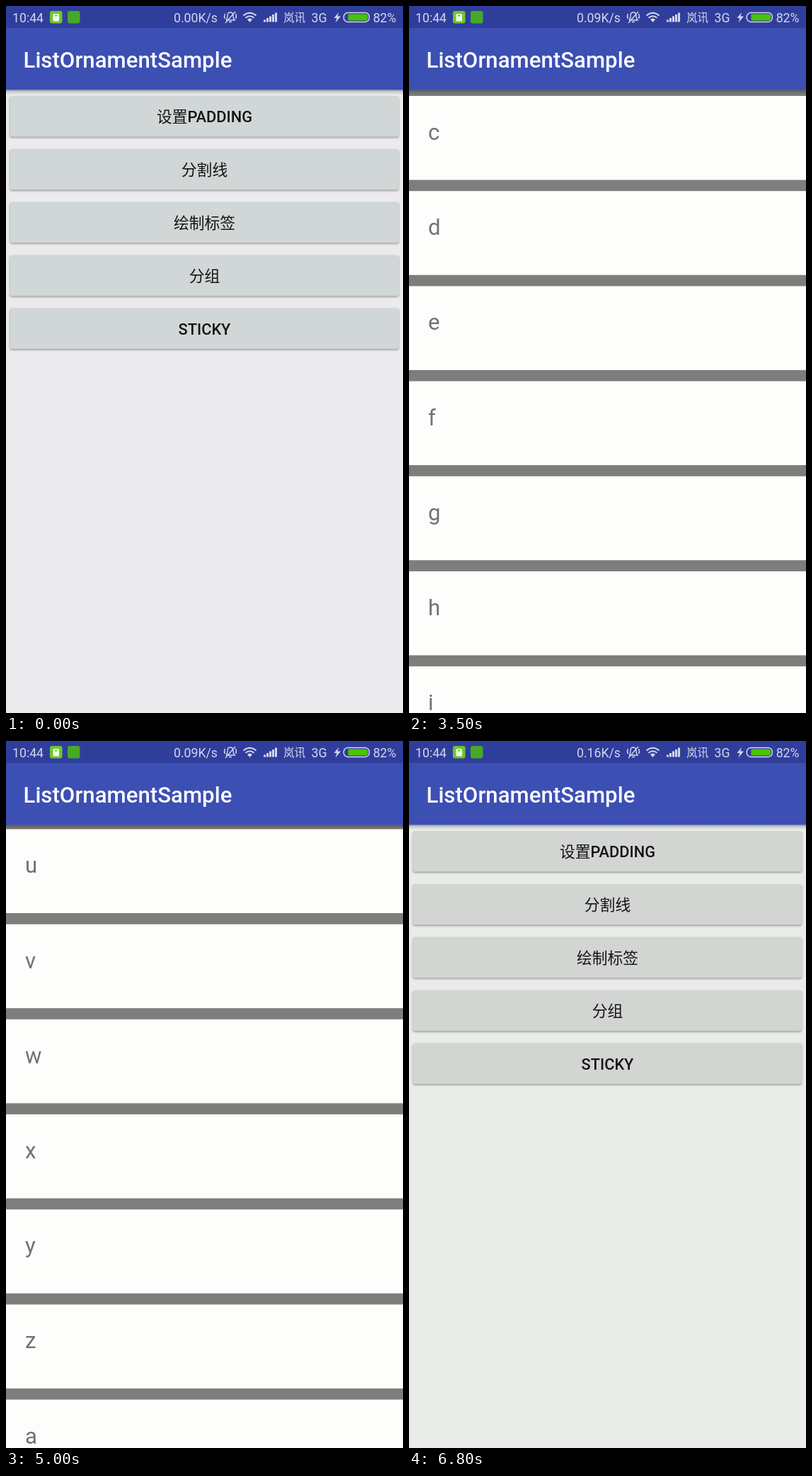
Write an HTML page with a canvas that moves like this. It is 561 by 998 pixels and loops after 7.3 s.

```html
<!DOCTYPE html>
<html lang="zh">
<head>
<meta charset="utf-8">
<style>
html, body { margin: 0; width: 100%; height: 100%; overflow: hidden; background: #eaecea; }
canvas { display: block; }
</style>
</head>
<body>
<canvas id="stage" width="561" height="998"></canvas>
<script>
const W = 561, H = 998, LOOP = 7300, STEP = 100;
const BAR_TOP = 31, BAR_END = 118.5;
const ROW = 134.2, ROW_BODY = 118.5;
const LABELS = ['设置PADDING', '分割线', '绘制标签', '分组', 'STICKY'];
const FAMILY = 'Roboto, "Noto Sans CJK SC", "Noto Sans CJK", sans-serif';
const ICON = '#d3d7ec';
const c = document.getElementById('stage').getContext('2d');

const easeOut = (t, start, length, power) =>
  1 - (1 - Math.min(1, Math.max(0, (t - start) / length))) ** power;

function rect(x, y, w, h, color) {
  c.fillStyle = color;
  c.fillRect(x, y, w, h);
}

function round(x, y, w, h, r, color) {
  c.beginPath();
  c.roundRect(x, y, w, h, r);
  c.fillStyle = color;
  c.fill();
}

function text(str, x, y, size, color, weight = 400, align = 'left') {
  c.font = `${weight} ${size}px ${FAMILY}`;
  c.textAlign = align;
  c.fillStyle = color;
  c.fillText(str, x, y);
}

function stroke(path, width = 1.5) {
  c.strokeStyle = ICON;
  c.lineWidth = width;
  c.stroke(new Path2D(path));
}

function appBar() {
  const shade = c.createLinearGradient(0, BAR_END, 0, BAR_END + 7);
  shade.addColorStop(0, 'rgba(0,0,0,.32)');
  shade.addColorStop(.4, 'rgba(0,0,0,.12)');
  shade.addColorStop(1, 'rgba(0,0,0,0)');
  rect(0, BAR_END, W, 7, shade);
  rect(0, 0, W, BAR_TOP, '#303e9b');
  rect(0, BAR_TOP, W, BAR_END - BAR_TOP, '#3c4fb2');
  text('ListOrnamentSample', 24.5, 87, 31.2, '#fbfcff', 500);
}

function menu(t) {
  const early = t < 2000;
  rect(0, 0, W, H, early ? '#ebebed' : '#eaecea');
  LABELS.forEach((label, i) => {
    const y = 127 + 74.9 * i;
    c.save();
    c.shadowColor = 'rgba(0,0,0,.35)';
    c.shadowBlur = 3;
    c.shadowOffsetY = 1.5;
    round(5.5, y, 549.5, 57.5, 3, early ? '#d1d6d6' : '#d3d5d2');
    c.restore();
    text(label, W / 2, y + 37.4, 21.8, '#141616', 500, 'center');
  });
  appBar();
}

function list(scroll) {
  rect(0, 0, W, H, '#fdfefc');
  for (let i = Math.floor(scroll / ROW); ; i++) {
    const y = BAR_END + i * ROW - scroll;
    if (y > H) break;
    rect(0, y + ROW_BODY, W, ROW - ROW_BODY, '#7c7e7b');
    text(String.fromCharCode(97 + i % 26), 27, y + 62, 31.2, '#717271');
  }
  appBar();
}

function statusBar(speed) {
  text('10:44', 9, 22.5, 17.7, ICON);
  round(62, 7, 17.5, 17.5, 3, '#6cc82c');
  round(66.5, 11, 8.5, 10.5, 1.5, '#f4fbee');
  rect(69, 12.5, 3.5, 2, '#6cc82c');
  round(87, 7, 17.5, 17.5, 3, '#45a926');
  text(speed + 'K/s', 299, 22.5, 17.7, ICON, 400, 'right');

  // Muted bell
  stroke('M311 20H323Q321 18 321 14Q321 9 317 9Q313 9 313 14Q313 18 311 20M315 22.5H319M324 8L310 24M309.5 11Q307.5 14.5 309.5 18M324.5 11Q326.5 14.5 324.5 18', 1.4);
  // Wireless fan
  stroke('M335.5 13.5Q344.5 6 353.5 13.5M338.5 16.8Q344.5 11.6 350.5 16.8', 2);
  c.fillStyle = ICON;
  c.fill(new Path2D('M341 19Q344.5 16 348 19L344.5 23Z'));
  for (let i = 0; i < 5; i++) {
    const h = 3 + i * 2.5;
    rect(364 + i * 4, 22.5 - h, 3, h, ICON);
  }
  text('岚讯', 392, 22, 15.6, ICON);
  text('3G', 431.5, 22.5, 17.7, ICON);
  c.fill(new Path2D('M470 9L463.5 17H467.5L465.5 23.5L473 14.5H468.5Z'));
  c.beginPath();
  c.roundRect(477.3, 9.6, 36, 12.8, 5.5);
  c.strokeStyle = ICON;
  c.lineWidth = 1.5;
  c.stroke();
  round(483.5, 11.6, 27.8, 8.8, [0, 3.5, 3.5, 0], '#4cc20a');
  text('82%', 551.5, 22.5, 17.7, ICON, 400, 'right');
}

function scrollAt(t) {
  return t < 4300
    ? 1433 * easeOut(t, 3400, 1250, 2.4)
    : 1364 + 1385 * easeOut(t, 4300, 1000, 2.468);
}

function draw(t) {
  const slide = easeOut(t, 2200, 400, 2.4) - easeOut(t, 5700, 400, 2.21);
  const behind = easeOut(t, 2200, 400, 2) - easeOut(t, 5700, 400, 1.8);

  c.save();
  c.translate(-W / 4 * behind, 0);
  menu(t);
  c.restore();
  rect(0, 0, W, H, `rgba(0,0,0,${.4 * behind})`);

  if (slide > 0) {
    c.save();
    c.translate(Math.round(W * (1 - slide)), 0);
    list(scrollAt(t));
    c.restore();
  }
  statusBar(t < 1600 ? '0.00' : t < 5600 ? '0.09' : '0.16');
}

const begin = performance.now();
function tick() {
  const t = (performance.now() - begin) % LOOP;
  draw(Math.floor(t / STEP) * STEP);
  requestAnimationFrame(tick);
}
tick();
</script>
</body>
</html>
```
